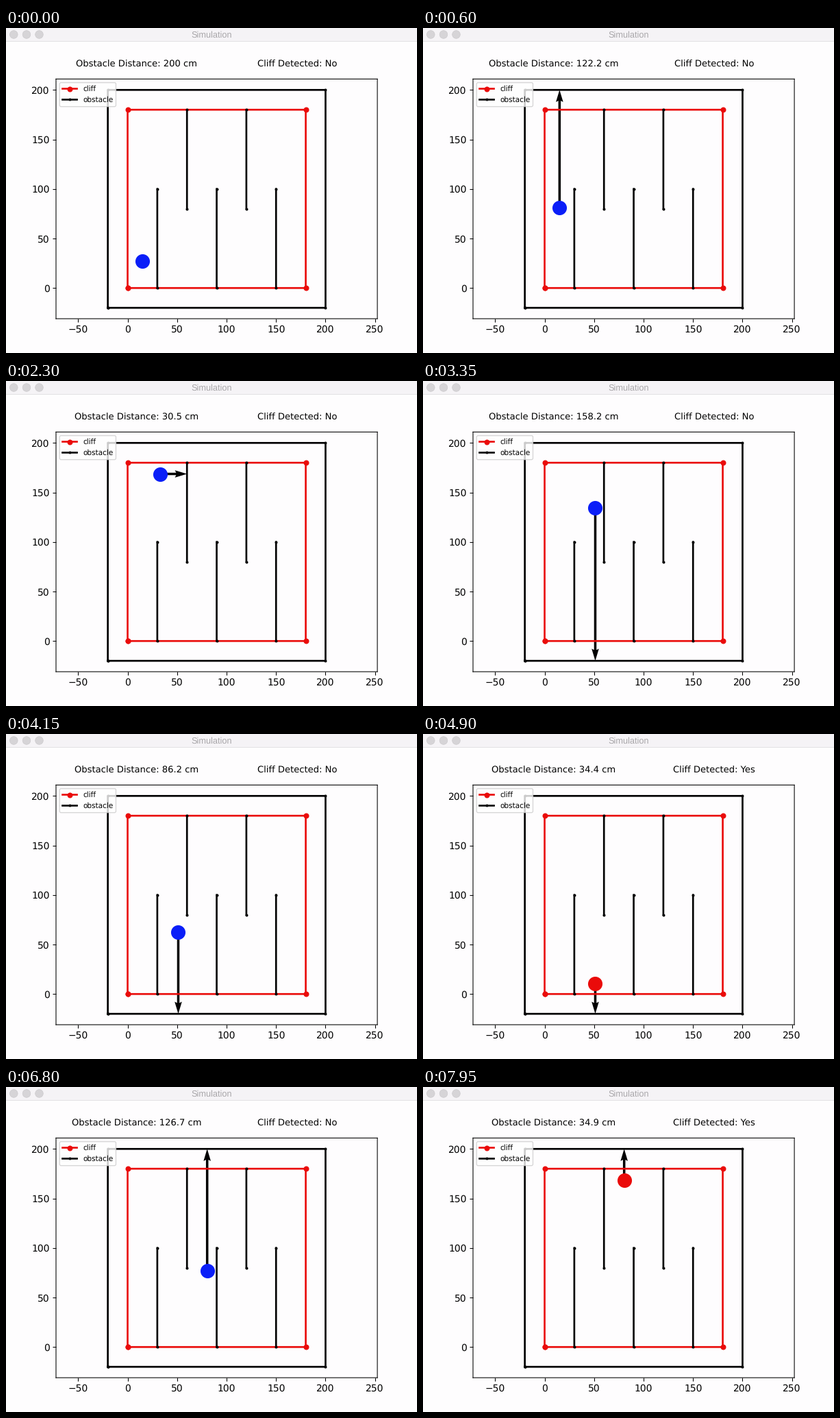
Animation of 600 by 474 pixels, one loop 8 s. Source, as a matplotlib script:

```python
import numpy as np
import matplotlib.pyplot as plt
from matplotlib.animation import FuncAnimation
from matplotlib.patches import Circle, Rectangle

W, H, DPI = 600, 474, 96
FRAMES, INTERVAL = 160, 50
PAPER, RED, BLUE = "#fefdfe", "#ea0b0a", "#0a1ef8"
LOW, HIGH = -20, 200          # outer wall
CLIFF = 180                   # side of the cliff square
SENSOR_OFFSET = 3.6
WALLS = [(30, 0, 100), (60, 80, 180), (90, 0, 100), (120, 80, 180), (150, 0, 100)]
NORTH, EAST, SOUTH = (0, 1), (1, 0), (0, -1)

# Robot path: straight runs at steady speed with pauses to turn
X_KEYS = ([42, 50, 105, 111.5], [15.1, 51.2, 51.2, 80.4])
Y_KEYS = ([0, 31.4, 59.42, 94.5, 121.31, 156.4],
          [27.4, 168.7, 168.7, 10.8, 10.8, 168.7])
TURNS = [(0, NORTH), (41, EAST), (54, NORTH), (58, SOUTH),
         (104, EAST), (118, SOUTH), (121, NORTH)]

plt.rcParams.update({
    "font.family": "DejaVu Sans", "font.size": 9.85,
    "xtick.labelsize": 10.4, "ytick.labelsize": 10.4,
    "path.snap": False, "text.hinting": "none",
})
fig = plt.figure(figsize=(W / DPI, H / DPI), dpi=DPI, facecolor=PAPER)


def draw_title_bar():
    bar = fig.add_axes([0, 0, 1, 1])
    bar.set(xlim=(0, W), ylim=(H, 0))
    bar.axis("off")
    bar.add_patch(Rectangle((0, 0), W, 20, fc="#f5f3f6", lw=0))
    bar.add_patch(Rectangle((0, 19), W, 1, fc="#e3e1e4", lw=0))
    for x in (11.3, 30, 48.5):
        bar.add_patch(Circle((x, 9.5), 5.8, fc="#d6d4d7", ec="#cccacd", lw=0.5))
    bar.text(299.7, 14.2, "Simulation", ha="center", color="#a9a7aa",
             family="Liberation Sans", size=12.8 * 72 / DPI)


def draw_square(low, high, style, **kw):
    ax.plot([low, low, high, high, low], [low, high, high, low, low],
            style, lw=2, **kw)


draw_title_bar()
ax = fig.add_axes([73 / W, 50 / H, 469.1 / W, 349.6 / H], facecolor=PAPER)
ax.set(xlim=(-72.35, 252.35), ylim=(LOW - 11, HIGH + 11),
       xticks=range(-50, 251, 50), yticks=range(0, 201, 50))
draw_square(0, CLIFF, "o-", ms=5, color=RED, label="cliff")
draw_square(LOW, HIGH, ".-", ms=4, color="black", label="obstacle")
for wx, y0, y1 in WALLS:
    ax.plot([wx, wx], [y0, y1], ".-", ms=4, color="black", lw=2)
ax.legend(loc="upper left", fontsize=7.9)

arrow = ax.quiver([0], [0], [1], [0], angles="xy", scale_units="xy", scale=1)
ball, = ax.plot([], [], "o", ms=14.8)
dist_text = ax.text(0.25, 1.05, "", transform=ax.transAxes, ha="center")
cliff_text = ax.text(0.75, 1.05, "", transform=ax.transAxes, ha="center")


def ray(x, y, heading):
    """Distance from (x, y) to the first obstacle ahead."""
    if heading == NORTH:
        return HIGH - y
    if heading == SOUTH:
        return y - LOW
    hits = [wx for wx, y0, y1 in WALLS if wx > x and y0 <= y <= y1]
    return min(hits + [HIGH]) - x


def update(i):
    x, y = np.interp(i, *X_KEYS), np.interp(i, *Y_KEYS)
    heading = [h for start, h in TURNS if start <= i][-1]
    dist = ray(x, y, heading)
    at_cliff = not 0 <= y + 11.5 * heading[1] <= CLIFF

    ball.set_data([x], [y])
    ball.set_color(RED if at_cliff else BLUE)
    arrow.set_offsets([(x, y)])
    arrow.set_UVC([dist * heading[0]], [dist * heading[1]])
    arrow.set_visible(i > 0)
    reading = f"{dist + SENSOR_OFFSET:.1f}" if i else "200"
    dist_text.set_text(f"Obstacle Distance: {reading} cm")
    cliff_text.set_text(f"Cliff Detected: {'Yes' if at_cliff else 'No'}")
    return ball, arrow, dist_text, cliff_text


anim = FuncAnimation(fig, update, frames=FRAMES, interval=INTERVAL,
                     repeat=True, repeat_delay=0)
plt.show()
```
